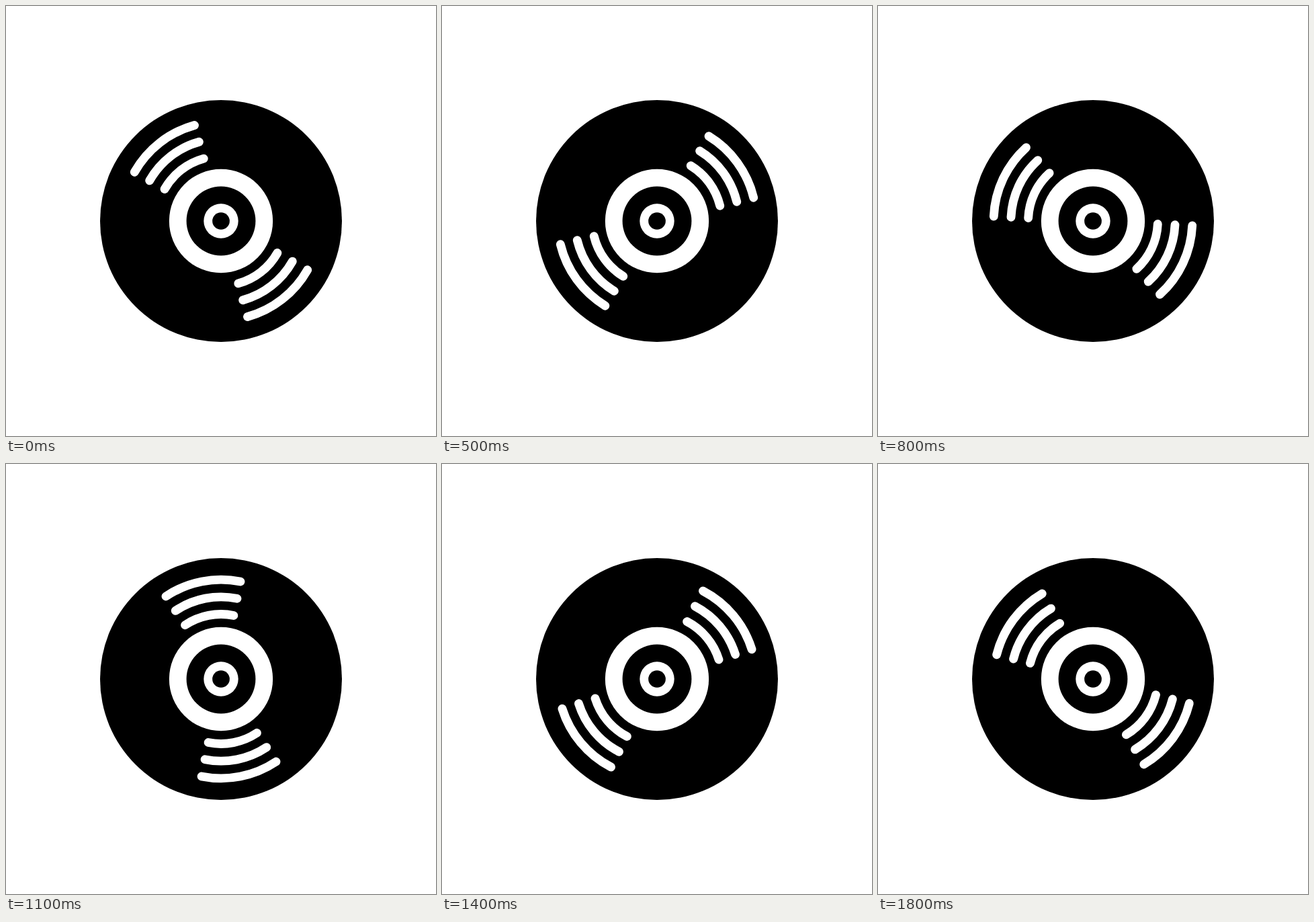
An HTML page that plays this animation: 640x640 px, repeating every 1900 ms.

```html
<!DOCTYPE html>
<html lang="en">
<head>
<meta charset="utf-8">
<title>Spinning record</title>
<style>
  html, body { margin: 0; width: 100%; height: 100%; overflow: hidden; background: #fff; }
  svg { display: block; width: 100vw; height: 100vh; }
</style>
</head>
<body>
<svg viewBox="-320 -320 640 640">
  <g id="disc"></g>
  <g id="grooves" fill="none" stroke="#fff" stroke-linecap="round"></g>
</svg>
<script>
  const NS = 'http://www.w3.org/2000/svg';
  const UNIT = 180 / 7;
  const STEP_MS = 100, STEPS = 19;
  const TURN = 360 / 47;      // one tick of the 47-tick revolution
  const TICKS_PER_STEP = 2.5;
  const START = -38;

  const disc = document.getElementById('disc');
  const grooves = document.getElementById('grooves');

  function add(parent, tag, attrs) {
    const el = document.createElementNS(NS, tag);
    for (const key in attrs) el.setAttribute(key, attrs[key]);
    parent.append(el);
  }

  [7, 3, 2, 1, 0.5].forEach((r, i) =>
    add(disc, 'circle', { r: r * UNIT, fill: i % 2 ? '#fff' : '#000' }));

  grooves.setAttribute('stroke-width', UNIT / 2);
  const half = Math.PI / 8;
  for (const side of [-1, 1]) {
    for (const ring of [3.75, 4.75, 5.75]) {
      const r = ring * UNIT;
      const x = r * Math.sin(half), y = side * r * Math.cos(half);
      add(grooves, 'path', { d: `M${-x} ${y}A${r} ${r} 0 0 ${side < 0 ? 1 : 0} ${x} ${y}` });
    }
  }

  const begin = performance.now();
  function draw(now) {
    const step = Math.floor(Math.max(0, now - begin) / STEP_MS) % STEPS;
    const angle = START + Math.floor(step * TICKS_PER_STEP) * TURN;
    grooves.setAttribute('transform', `rotate(${angle})`);
    requestAnimationFrame(draw);
  }
  draw(begin);
</script>
</body>
</html>
```
